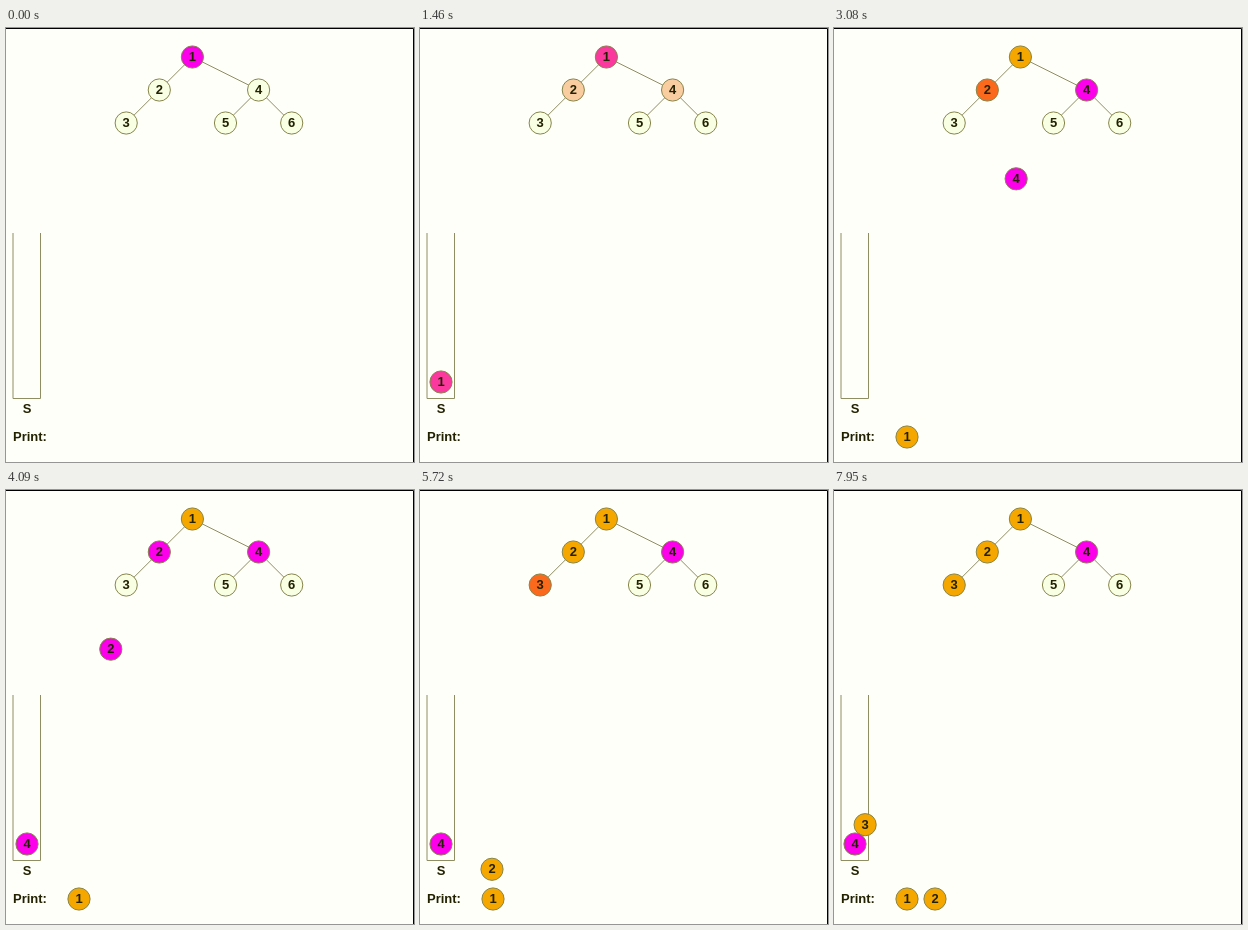
An HTML page that plays this animation: 408 px wide and 434 px high, repeating every 7.99 s.

```html
<!DOCTYPE html>
<html lang="en">
<head>
<meta charset="utf-8">
<title>Preorder traversal with a stack</title>
<style>
  html, body { margin: 0; width: 100%; height: 100%; overflow: hidden; background: #fffffa; }
  svg { display: block; width: 408px; height: 434px; }
  text { font: bold 13px "Liberation Sans", Arial, sans-serif; fill: #222200; }
  .mid { text-anchor: middle; }
  .wire { fill: none; stroke: #8e8e62; stroke-width: 1; }
  circle { stroke: #86864c; stroke-width: 1; }
</style>
</head>
<body>
<svg id="stage" viewBox="0 0 408 434">
  <rect width="408" height="434" fill="#fffffa"/>
  <path d="M0 .5H407.5V434" fill="none" stroke="#000"/>
  <path class="wire" d="M7 205V370.5H34.5V205"/>
  <text class="mid" x="21" y="384.7">S</text>
  <text x="7" y="412.7">Print:</text>
</svg>
<script>
const LOOP = 7990, STEP = 40, TRAVEL = 480;
const PALE = [249, 255, 227], RED = [251, 106, 28], PINK = [252, 0, 236], GOLD = [245, 167, 0];
const stage = document.getElementById('stage');

// Colour changes: [time, colour, number of steps]
const nodes = {
  1: { x: 186.4, y: 29, tints: [[0, PINK, 1], [1460, GOLD, 3]] },
  2: { x: 153.3, y: 62, tints: [[0, PALE, 1], [1460, RED, 3], [3890, PINK, 1], [4950, GOLD, 3]] },
  3: { x: 120.2, y: 95, tints: [[0, PALE, 1], [4950, RED, 3], [6410, PINK, 1], [7420, GOLD, 3]] },
  4: { x: 252.6, y: 62, tints: [[0, PALE, 1], [1460, RED, 3], [2960, PINK, 1]] },
  5: { x: 219.5, y: 95, tints: [[0, PALE, 1]] },
  6: { x: 285.7, y: 95, tints: [[0, PALE, 1]] }
};
const edges = [[1, 2], [1, 4], [2, 3], [4, 5], [4, 6]];

const slot = i => ({ x: 21, y: 354 - 27 * i });
const printed = i => ({ x: 73 + 28 * i, y: 409 });

// Moves: first visible step, start of travel, destination
const move = (first, start, to) => ({ first, start, to });
const tokens = [
  { id: 1, moves: [move(490, 450, slot(0)), move(1990, 1942, printed(0))] },
  { id: 2, moves: [move(3930, 3914, slot(1)), move(5430, 5404, printed(1))] },
  { id: 3, moves: [move(6410, 6370, slot(1)), move(7950, 7905, printed(2))] },
  { id: 4, moves: [move(2960, 2934, slot(0))] }
];

function add(parent, tag, attrs, label) {
  const el = document.createElementNS('http://www.w3.org/2000/svg', tag);
  for (const key in attrs) el.setAttribute(key, attrs[key]);
  if (label) el.textContent = label;
  return parent.appendChild(el);
}

function disc(id) {
  const g = add(stage, 'g', {});
  const ball = add(g, 'circle', { r: 11.1 });
  add(g, 'text', { class: 'mid', y: 4 }, id);
  return { g, ball };
}

const place = (g, p) => g.setAttribute('transform', `translate(${p.x} ${p.y})`);
const mix = (a, b, k) => a + (b - a) * k;

function tintAt(tints, t) {
  let rgb = tints[0][1];
  for (const [time, colour, steps] of tints) {
    if (t < time) break;
    const k = Math.min(1, (Math.floor((t - time) / STEP) + 1) / steps);
    rgb = rgb.map((c, i) => mix(c, colour[i], k));
  }
  return `rgb(${rgb.map(Math.round)})`;
}

function placeAt(token, t) {
  let p = nodes[token.id];
  for (const { first, start, to } of token.moves) {
    if (t < first) break;
    const shown = first + Math.floor((t - first) / STEP) * STEP;
    const k = Math.min(1, (shown - start) / TRAVEL);
    p = { x: mix(p.x, to.x, k), y: mix(p.y, to.y, k) };
  }
  return p;
}

for (const [a, b] of edges) {
  const p = nodes[a], q = nodes[b];
  add(stage, 'line', { class: 'wire', x1: p.x, y1: p.y, x2: q.x, y2: q.y });
}
for (const id in nodes) {
  Object.assign(nodes[id], disc(id));
  place(nodes[id].g, nodes[id]);
}
for (const token of tokens) Object.assign(token, disc(token.id));

function draw(t) {
  for (const id in nodes) nodes[id].ball.setAttribute('fill', tintAt(nodes[id].tints, t));
  for (const token of tokens) {
    token.g.setAttribute('visibility', t < token.moves[0].first ? 'hidden' : 'visible');
    token.ball.setAttribute('fill', tintAt(nodes[token.id].tints, t));
    place(token.g, placeAt(token, t));
  }
}

const begin = performance.now();
function tick() {
  draw((performance.now() - begin) % LOOP);
  requestAnimationFrame(tick);
}
tick();
</script>
</body>
</html>
```
